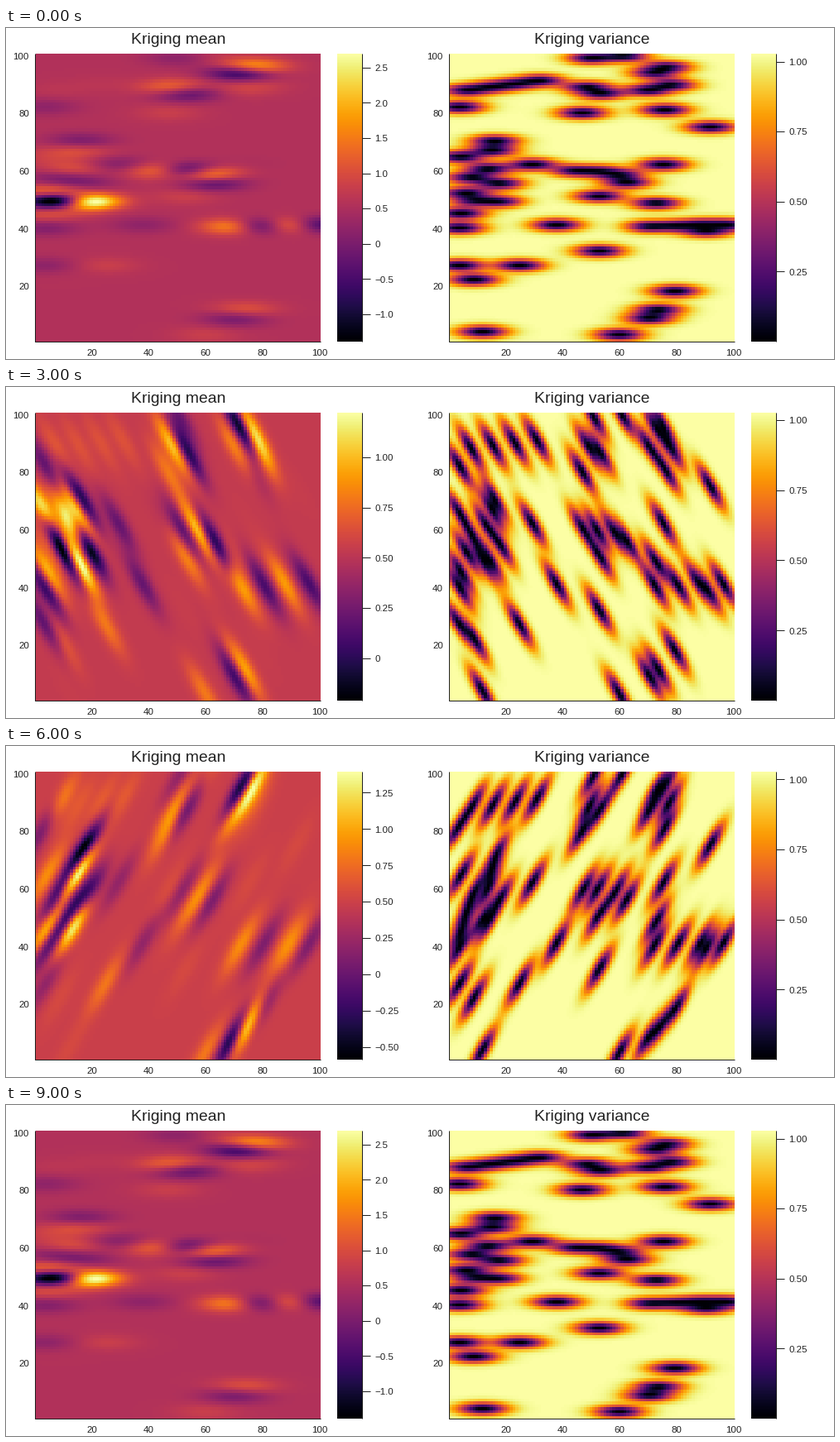
A matplotlib script for the animation above (10 s loop, 1000x400 px).

```python
import numpy as np
import matplotlib.pyplot as plt
from matplotlib.animation import FuncAnimation

W, H, DPI = 1000, 400, 100
PX = 72 / DPI
FRAMES = 10
TOP, BOTTOM, SIDE = 31, 379, 344
INK = "#222222"
LONG, SHORT = 20, 5  # variogram ranges along the two axes
LOW, HIGH = .1, .9

# Runs of samples, (start, end, count), alternating low and high
RUNS = [
    ((73.6, 94.4), (75.5, 95.3), 2), ((53, 87), (49.5, 88.5), 2),
    ((16.3, 70), (15.4, 67), 2), ((8.5, 57.5), (4.5, 64.7), 2),
    ((17.7, 55.5), (14, 60.5), 2), ((62.5, 56), (58.5, 58.7), 2),
    ((12.4, 49.4), (14.3, 49.3), 2), ((4, 40), (4.5, 45), 2),
    ((96.5, 41), (72.5, 40.5), 4), ((70.8, 8.8), (73.6, 11.4), 2),
]
# Lone samples by level
LONE = {
    .2: [(51, 99), (4, 82), (29.5, 62), (52.3, 59.6), (38, 41), (4, 27)],
    .55: [(61, 99.6), (76, 81), (92, 75), (75.5, 62), (47.5, 59.8), (6.5, 52),
          (73, 48.5), (53, 32), (9, 22), (79.5, 18), (12, 4)],
    .65: np.linspace((8, 88), (31, 91), 4),
    .8: [(77.5, 89.5), (71, 88), (47, 80), (53, 51), (90.5, 39.3), (25, 27),
         (60, 3)],
}


def samples():
    """Sample positions and their values."""
    sites = [np.linspace(a, b, n) for a, b, n in RUNS]
    values = [np.tile([LOW, HIGH], n // 2) for _, _, n in RUNS]
    for level, points in LONE.items():
        sites.append(np.array(points))
        values.append(np.full(len(points), level))
    return np.concatenate(sites), np.concatenate(values)


SITES, VALUES = samples()
cells = np.arange(1, 101)
GRID = np.stack(np.meshgrid(cells, cells), -1).reshape(-1, 2)


def covariance(a, b, theta):
    """Gaussian covariance stretched along direction theta."""
    d = a[:, None] - b[None]
    c, s = np.cos(theta), np.sin(theta)
    u = (d[..., 0] * c + d[..., 1] * s) / LONG
    v = (d[..., 1] * c - d[..., 0] * s) / SHORT
    return np.exp(-3 * (u * u + v * v))


def krige(theta):
    """Ordinary kriging mean and variance on the grid."""
    n = len(SITES)
    lhs = np.ones((n + 1, n + 1))
    lhs[:n, :n] = covariance(SITES, SITES, theta) + 1e-6 * np.eye(n)
    lhs[n, n] = 0
    rhs = np.ones((n + 1, len(GRID)))
    rhs[:n] = covariance(SITES, GRID, theta)
    sol = np.linalg.solve(lhs, rhs)
    mean = VALUES @ sol[:n]
    var = 1 - (sol * rhs).sum(0)
    return mean.reshape(100, 100), var.reshape(100, 100)


fig = plt.figure(figsize=(W / DPI, H / DPI), dpi=DPI, facecolor="white")
ax = fig.add_axes([0, 0, 1, 1])
ax.axis("off")


def label(x, y, text, size=11.5, ha="center"):
    return ax.text(x, y, text, fontsize=size * PX, color=INK, ha=ha,
                   va="center_baseline", family="Liberation Sans")


def line(xs, ys):
    return ax.plot(xs, ys, color=INK, lw=PX, solid_capstyle="butt")[0]


def image(data, x0, x1):
    return ax.imshow(data, extent=(x0, x1, BOTTOM, TOP), origin="lower",
                     cmap="inferno", interpolation="nearest", aspect="auto")


class Panel:
    """Heat map with axes, title and a colour bar that follows the data."""

    def __init__(self, x0, title):
        x1 = x0 + SIDE
        self.bar = x1 + 50
        self.ticks = []
        self.heat = image(np.zeros((100, 100)), x0, x1)
        image(np.linspace(0, 1, 256)[:, None], self.bar - 30, self.bar)
        line([x0 - 1, x0 - 1, x1], [TOP, BOTTOM, BOTTOM])
        line([self.bar, self.bar], [TOP, BOTTOM])
        label((x0 + x1) / 2, 12.2, title, 19.4)
        for v in range(20, 101, 20):
            part = (v - .5) / 100
            label(x0 + part * SIDE + .4, 391.5, str(v))
            label(x0 - 8, BOTTOM - part * (BOTTOM - TOP) + 1, str(v),
                  ha="right")

    def show(self, data):
        lo, hi = data.min(), data.max()
        self.heat.set_data(data)
        self.heat.set_clim(lo, hi)
        for artist in self.ticks:
            artist.remove()
        self.ticks = []
        step, digits = (.25, 2) if hi - lo < 3 else (.5, 1)
        for k in range(int(np.ceil(lo / step)), int(hi // step) + 1):
            y = BOTTOM - (k * step - lo) / (hi - lo) * (BOTTOM - TOP)
            text = f"{k * step:.{digits}f}" if k else "0"
            self.ticks += [
                line([self.bar, self.bar + 10], [y, y]),
                label(self.bar + 15, y + .3, text.replace("-", "\u2212"),
                      ha="left"),
            ]


panels = [Panel(36, "Kriging mean"), Panel(536, "Kriging variance")]
ax.set_xlim(0, W)
ax.set_ylim(H, 0)


def draw(i):
    theta = 2 * np.pi * i / (FRAMES - 1)
    for panel, data in zip(panels, krige(theta)):
        panel.show(data)


anim = FuncAnimation(fig, draw, frames=FRAMES, interval=1000, repeat=True,
                     repeat_delay=0, blit=False)
plt.show()
```
